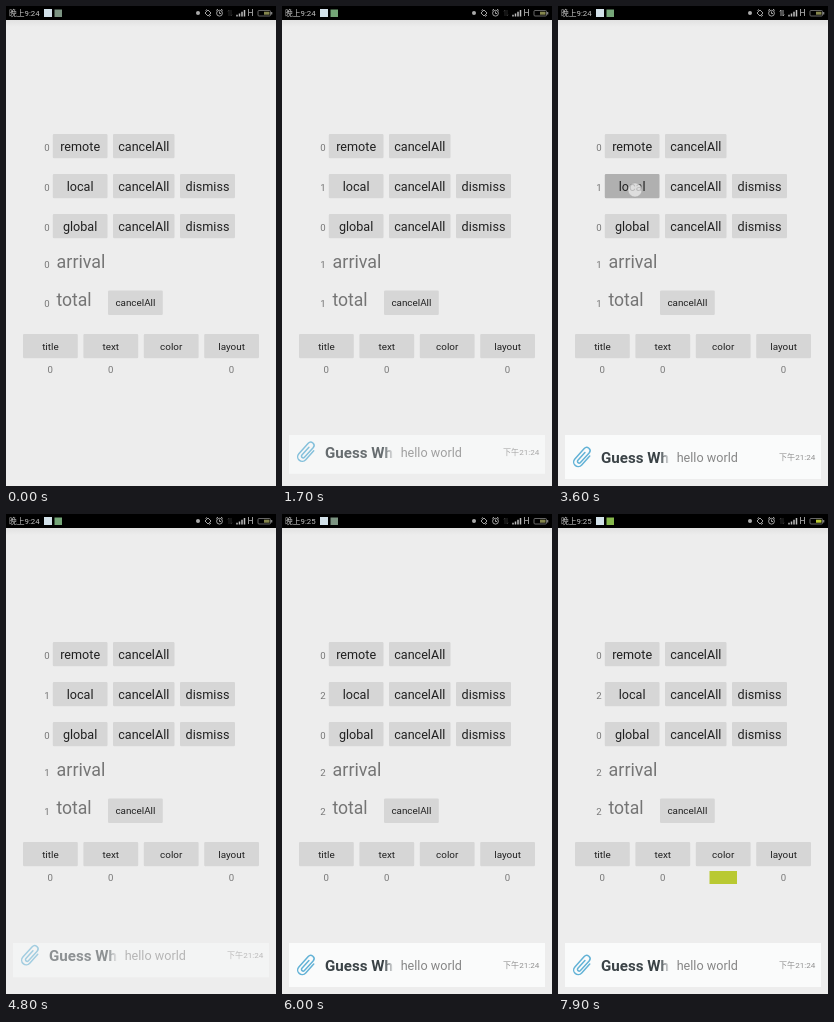
Write an HTML page that moves like this. It is 270 px wide and 480 px high and loops after 8 s.

```html
<!DOCTYPE html>
<html lang="en">
<head>
<meta charset="utf-8">
<title>Notification demo</title>
<style>
html, body { margin: 0; width: 100%; height: 100%; overflow: hidden; background: #ededed; }
svg { display: block; width: 100%; height: 100%; }
text { font-family: Roboto, "Noto Sans CJK SC", "Noto Sans CJK", sans-serif; }
</style>
</head>
<body>
<svg id="stage" viewBox="0 0 270 480">
  <defs>
    <linearGradient id="shade" x1="0" y1="0" x2="0" y2="1">
      <stop offset="0" stop-color="#e0e0e0"/><stop offset="1" stop-color="#ededed"/>
    </linearGradient>
    <linearGradient id="edge" gradientUnits="userSpaceOnUse" x1="102" y1="0" x2="112" y2="0">
      <stop offset="0" stop-color="#fff"/><stop offset="1" stop-color="#000"/>
    </linearGradient>
    <mask id="clip" maskUnits="userSpaceOnUse" x="40" y="436" width="71" height="32">
      <rect x="40" y="436" width="71" height="32" fill="url(#edge)"/>
    </mask>
    <clipPath id="slot"><rect x="7" y="429" width="256" height="44"/></clipPath>
  </defs>
  <rect width="270" height="480" fill="#ededed"/>
  <rect y="13" width="270" height="8" fill="url(#shade)"/>
  <rect width="270" height="14" fill="#000"/>
  <g id="status">
    <text id="clock" x="3" y="10" font-size="7.8" fill="#c4c4c4"></text>
    <rect x="38" y="3" width="8" height="8" fill="#d3e2ea"/>
    <rect id="app" x="48.5" y="3.5" width="7.5" height="7.5"/>
    <circle cx="192" cy="7" r="2" fill="#aaa"/>
    <g fill="none" stroke="#b4b4b4" stroke-width=".9">
      <path d="M199 7l3-3 3 3-3 3zM199.5 4.5l1.5-1M203 10.5l2-1.5"/>
      <circle cx="213.5" cy="7.2" r="2.9"/>
      <path d="M213.5 5.5v2h1.5M210.2 4.5l1.8-1.4M216.8 4.5l-1.8-1.4"/>
      <path id="arrows" d="M223 10V4l-1.2 1.5M225 4v6l1.2-1.5"/>
    </g>
    <path d="M231 10.5V8.8M233.5 10.5V7.4M236 10.5V5.8M238.5 10.5V4" stroke="#bdbdbd" stroke-width="1.5"/>
    <text x="241.5" y="10.3" font-size="8.5" fill="#bdbdbd">H</text>
    <rect x="252" y="4.5" width="12.5" height="5.5" rx="1" fill="none" stroke="#808080" stroke-width=".8"/>
    <rect x="264.8" y="6" width="1.5" height="2.5" fill="#808080"/>
    <rect id="charge" x="258" y="5.7" width="5.5" height="3"/>
  </g>
  <g id="panel"></g>
  <rect id="swatch" x="151.5" y="357" width="27.5" height="13" fill="#b9c932"/>
  <circle id="touch" r="7" fill="#eee" fill-opacity=".75" stroke="#999" stroke-opacity=".5" stroke-width=".8"/>
  <g clip-path="url(#slot)">
    <g id="note">
      <rect x="7" y="429" width="256" height="44" fill="#fafbfb"/>
      <path transform="translate(24.3 451.5) rotate(42)" fill="none" stroke="#62b2d6" stroke-width="1.5" stroke-linecap="round"
        d="M4.6-6V6a4.6 4.6 0 0 1-9.2 0V-8a3.3 3.3 0 0 1 6.6 0V5a1.7 1.7 0 0 1-3.4 0V-5.5"/>
      <text x="43" y="457" font-size="15.1" font-weight="700" fill="#3a4246" mask="url(#clip)">Guess Who</text>
      <text x="118.7" y="456" font-size="12.6" fill="#868686">hello world</text>
      <text x="221" y="454" font-size="8.1" fill="#929292">下午21:24</text>
    </g>
  </g>
</svg>
<script>
const LOOP = 8000, STEP = 100;
const SLIDE = 21;
const NS = "http://www.w3.org/2000/svg";
const $ = id => document.getElementById(id);
const panel = $("panel");

function add(tag, attrs, text = "") {
  const el = document.createElementNS(NS, tag);
  for (const key in attrs) el.setAttribute(key, attrs[key]);
  el.textContent = text;
  return panel.appendChild(el);
}

function label(x, y, size, fill, text, anchor = "start") {
  return add("text", { x, y, "font-size": size, fill, "text-anchor": anchor }, text);
}

function button(x, y, w, text, size = 12.6) {
  const face = add("rect", { x, y, width: w, height: 24.4, rx: 1.2, fill: "#d6d6d6" });
  label(x + w / 2, y + 12.4 + size * 0.35, size, "#202020", text, "middle");
  return face;
}

const count = (x, y) => label(x, y, 9.6, "#777", "0", "middle");

const faces = {};
["remote", "local", "global"].forEach((name, i) => {
  const y = 127.9 + i * 40;
  faces[name] = button(46.8, y, 54.7, name);
  button(107, y, 61.5, "cancelAll");
  if (i) button(174, y, 55, "dismiss");
});
label(50.6, 262, 17.9, "#757575", "arrival");
label(50.4, 300.2, 17.6, "#757575", "total");
button(102, 284.5, 54.8, "cancelAll", 9.9);
["title", "text", "color", "layout"].forEach((name, i) => {
  faces[name] = button(17 + i * 60.4, 327.9, 54.8, name, 9.9);
  if (name !== "color") count(44.3 + i * 60.4, 367);
});

const counts = [145, 185, 225, 262, 300.5].map(y => count(41, y));
const live = [counts[1], counts[3], counts[4]];

const presses = [
  { name: "local", x: 77, y: 184, from: 500, to: 900 },
  { name: "local", x: 77, y: 184, from: 3600, to: 3800 },
  { name: "color", x: 166, y: 340, from: 6400, to: 6700 }
];

const ramp = (t, a, b) => Math.min(1, Math.max(0, (t - a) / (b - a)));
const easeOut = p => 1 - (1 - p) ** 2;
const between = (t, a, b) => t >= a && t < b;

// 1 when the notification rests in its slot, 0 when it is gone.
function noteShown(t) {
  if (t < 4500) return easeOut(ramp(t, 1300, 2100));
  if (t < 5100) return 1 - ramp(t, 4500, 5000) ** 1.5;
  return easeOut(ramp(t, 5100, 5700));
}

function gray(v) {
  const n = Math.round(v);
  return `rgb(${n},${n},${n})`;
}

function drawNote(t) {
  const shown = noteShown(t);
  $("note").setAttribute("opacity", shown);
  $("note").setAttribute("transform", `translate(0 ${-SLIDE * (1 - shown)})`);
}

function drawPress(t) {
  const touch = $("touch");
  faces.local.setAttribute("fill", "#d6d6d6");
  faces.color.setAttribute("fill", "#d6d6d6");
  touch.setAttribute("opacity", 0);
  const p = presses.find(q => between(t, q.from, q.to + 300));
  if (!p) return;
  const power = t < p.to ? 1 : 1 - ramp(t, p.to - 100, p.to + 200);
  faces[p.name].setAttribute("fill", gray(214 - 38 * power));
  touch.setAttribute("cx", p.x);
  touch.setAttribute("cy", p.y);
  touch.setAttribute("opacity", t < p.to ? 1 : 0);
}

function draw(t) {
  const total = t < 1400 ? 0 : t < 5200 ? 1 : 2;
  live.forEach(el => { el.textContent = total; });
  $("clock").textContent = t < 6000 ? "晚上9:24" : "晚上9:25";
  const tinted = t >= 6700;
  $("swatch").setAttribute("opacity", tinted ? 1 : 0);
  $("charge").setAttribute("fill", tinted ? "#b9c932" : "#85864d");
  $("app").setAttribute("fill", tinted ? "#86b84c" : between(t, 1400, 5200) ? "#75a678" : "#7c9482");
  $("arrows").setAttribute("opacity", between(t, 3100, 4600) ? 1 : 0.25);
  drawNote(t);
  drawPress(t);
}

const start = performance.now();
function tick() {
  const t = (performance.now() - start) % LOOP;
  draw(Math.floor(t / STEP) * STEP);
  requestAnimationFrame(tick);
}
tick();
</script>
</body>
</html>
```
